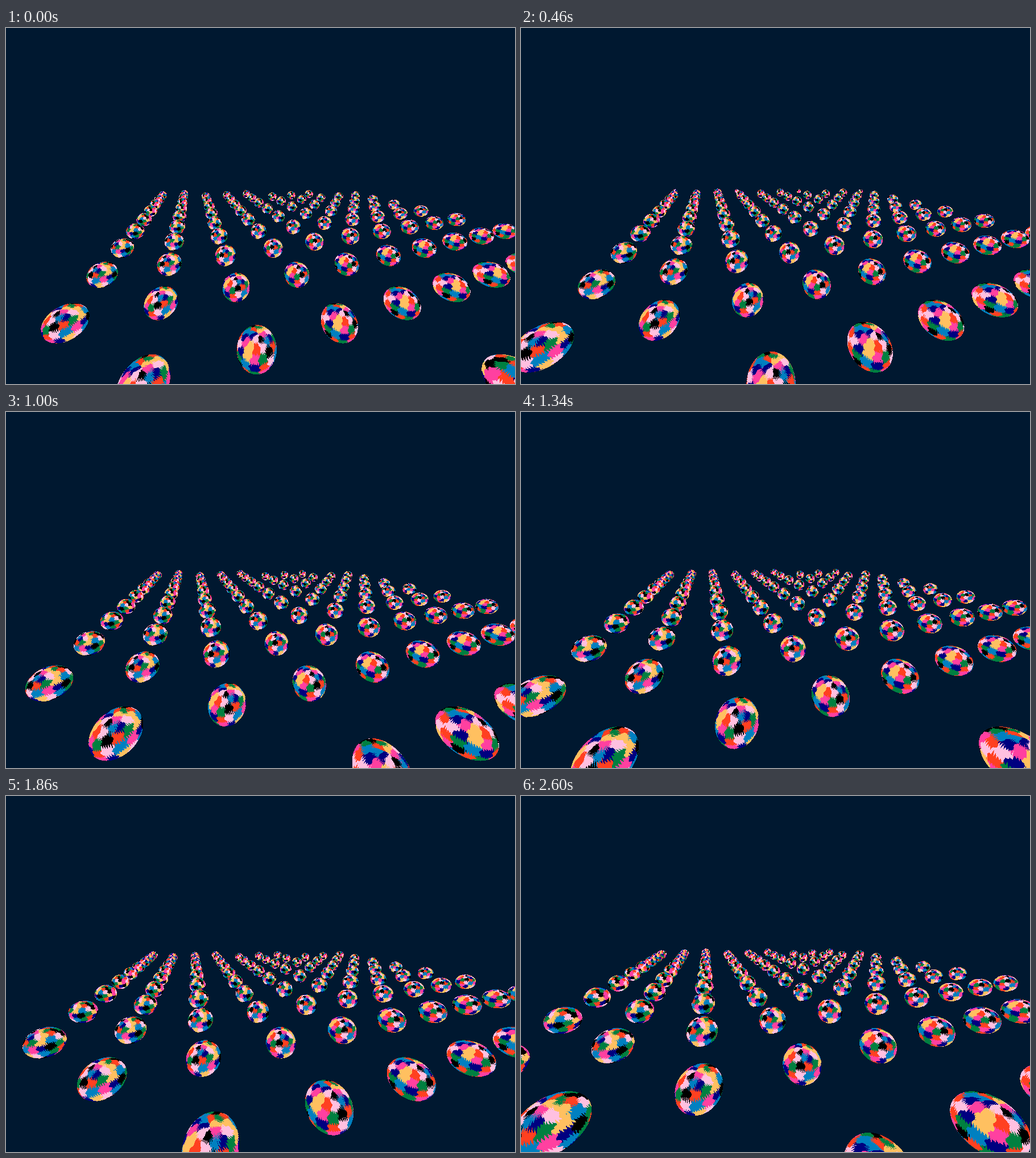
Animation of 895 by 626 pixels, one loop 2.62 s. Source, as an HTML page with a canvas:

```html
<!DOCTYPE html>
<html lang="en">
<head>
<meta charset="utf-8">
<title>Field of spheres</title>
<style>
  html, body { margin: 0; width: 100%; height: 100%; overflow: hidden; background: #001830; }
  canvas { display: block; width: 895px; height: 626px; image-rendering: pixelated; }
</style>
</head>
<body>
<canvas id="view" width="895" height="626"></canvas>
<script>
const W = 895, H = 626, CX = W / 2, CY = H / 2;
const LOOP = 2620, STEP = 20;

// Camera: focal length in px, horizon line, pitch, far plane
const FOCAL = 344, HORIZON = 225, FAR = 32.68;
const PITCH = Math.atan((CY - HORIZON) / FOCAL);
const SIN = Math.sin(PITCH), COS = Math.cos(PITCH);
const SPEED = 0.002595;
const RADIUS = 0.652, TWIST = 0.5;

const abgr = hex => (0xff000000 | (hex & 255) << 16 | hex & 0xff00 | hex >> 16) >>> 0;
const BACK = abgr(0x001830);
const INK = {
  n: abgr(0x000080), r: abgr(0xff4020), g: abgr(0x008040), b: abgr(0x0080c0),
  p: abgr(0xff40a0), l: abgr(0xffc0e0), o: abgr(0xffc060), k: abgr(0x000000)
};

// Patchwork skin: rings of coloured cells by latitude
const RINGS = [
  [74, 'nlkpogrb'],
  [50, 'porlbnlorkgbn'],
  [26, 'nopgkrgoblkprl'],
  [2, 'gbnrlbpnkgoplr'],
  [-24, 'krgpnolbgrnkop'],
  [-52, 'bgroknplg']
];
const TW = 512, TH = 256;
const hash = n => { const s = Math.sin(n * 127.1 + 11.7) * 43758.5453; return s - Math.floor(s); };
const wrap = a => a - 360 * Math.round(a / 360);

function makeSkin() {
  const cells = [];
  RINGS.forEach(([lat, inks], ring) => [...inks].forEach((ink, k) => {
    const seed = ring * 20 + k, gap = 360 / inks.length;
    cells.push({
      lon: -55 + gap * (k + 0.45 * (hash(seed) - 0.5)),
      lat: lat + 12 * (hash(seed + 300) - 0.5),
      ink: INK[ink]
    });
  }));
  const skin = new Uint32Array(TW * TH);
  for (let x = 0; x < TW; x++) {
    const strip = x / 7, id = Math.floor(strip);
    const tooth = (hash(id + 700) * 11 + 3) * (strip - id - 0.5);
    for (let y = 0; y < TH; y++) {
      const flat = 90 - (y + 0.5) * 180 / TH;
      const lat = flat + tooth;
      const lon = (x + 0.5) * 360 / TW - 180 + 2.5 * Math.sin(flat * 0.35);
      const squeeze = Math.max(0.12, Math.cos(flat * Math.PI / 180));
      let best = 1e9, ink = 0;
      for (const c of cells) {
        const u = wrap(lon - c.lon) * squeeze, v = lat - c.lat;
        const d = u * u + v * v;
        if (d < best) { best = d; ink = c.ink; }
      }
      skin[y * TW + x] = ink;
    }
  }
  return skin;
}

// Lattice seen at a yaw of one column step in three rows
const balls = [];
for (let row = -1; row <= 14; row++)
  for (let col = -2; col <= 7; col++)
    balls.push({ row, depth: 3 * row + col, side: -42 - 360 * row + 1064 * col });
balls.sort((a, b) => b.depth - a.depth);

const skin = makeSkin();
const ctx = document.getElementById('view').getContext('2d');
const image = ctx.createImageData(W, H);
const px = new Uint32Array(image.data.buffer);

// Pixel span covered by a sphere along one screen axis
function span(pos, z, mid, limit) {
  const k = FOCAL / (z * z - RADIUS * RADIUS);
  const c = mid + pos * z * k;
  const half = RADIUS * Math.sqrt(z * z + pos * pos - RADIUS * RADIUS) * k;
  return [Math.max(0, Math.floor(c - half)), Math.min(limit, Math.ceil(c + half))];
}

function drawBall(x, y, z, turn) {
  const [x0, x1] = span(x, z, CX, W), [y0, y1] = span(y, z, CY, H);
  const rest = x * x + y * y + z * z - RADIUS * RADIUS;
  for (let j = y0; j < y1; j++) {
    const dy = (j + 0.5 - CY) / FOCAL;
    for (let i = x0; i < x1; i++) {
      const dx = (i + 0.5 - CX) / FOCAL;
      const len = dx * dx + dy * dy + 1, dot = dx * x + dy * y + z;
      const disc = dot * dot - len * rest;
      if (disc < 0) continue;
      const hit = (dot - Math.sqrt(disc)) / len;
      if (hit > FAR) continue;
      const nx = (dx * hit - x) / RADIUS, ny = (dy * hit - y) / RADIUS, nz = (hit - z) / RADIUS;
      const up = -ny * COS - nz * SIN, toward = ny * SIN - nz * COS;
      const lon = (Math.atan2(nx, toward) + turn) / (2 * Math.PI) + 0.5;
      const lat = 0.5 - Math.asin(Math.max(-1, Math.min(1, up))) / Math.PI;
      const u = Math.floor((lon - Math.floor(lon)) * TW) % TW;
      const v = Math.min(TH - 1, Math.floor(lat * TH));
      px[j * W + i] = skin[v * TW + u];
    }
  }
}

function draw(time) {
  const gone = time * SPEED, drop = 2171 - 79.3 * gone;
  px.fill(BACK);
  for (const b of balls) {
    const z = b.depth + 6.42 - gone;
    if (z < 1.5 || z - RADIUS > FAR) continue;
    drawBall((b.side + 1.2 * gone) / FOCAL, (drop - (CY - HORIZON) * z) / FOCAL, z, b.row * TWIST);
  }
  ctx.putImageData(image, 0, 0);
}

const start = performance.now();
let last = -1;
function tick() {
  const t = Math.max(0, performance.now() - start) % LOOP;
  const now = Math.floor(t / STEP) * STEP;
  if (now !== last) draw(last = now);
  requestAnimationFrame(tick);
}
tick();
</script>
</body>
</html>
```
